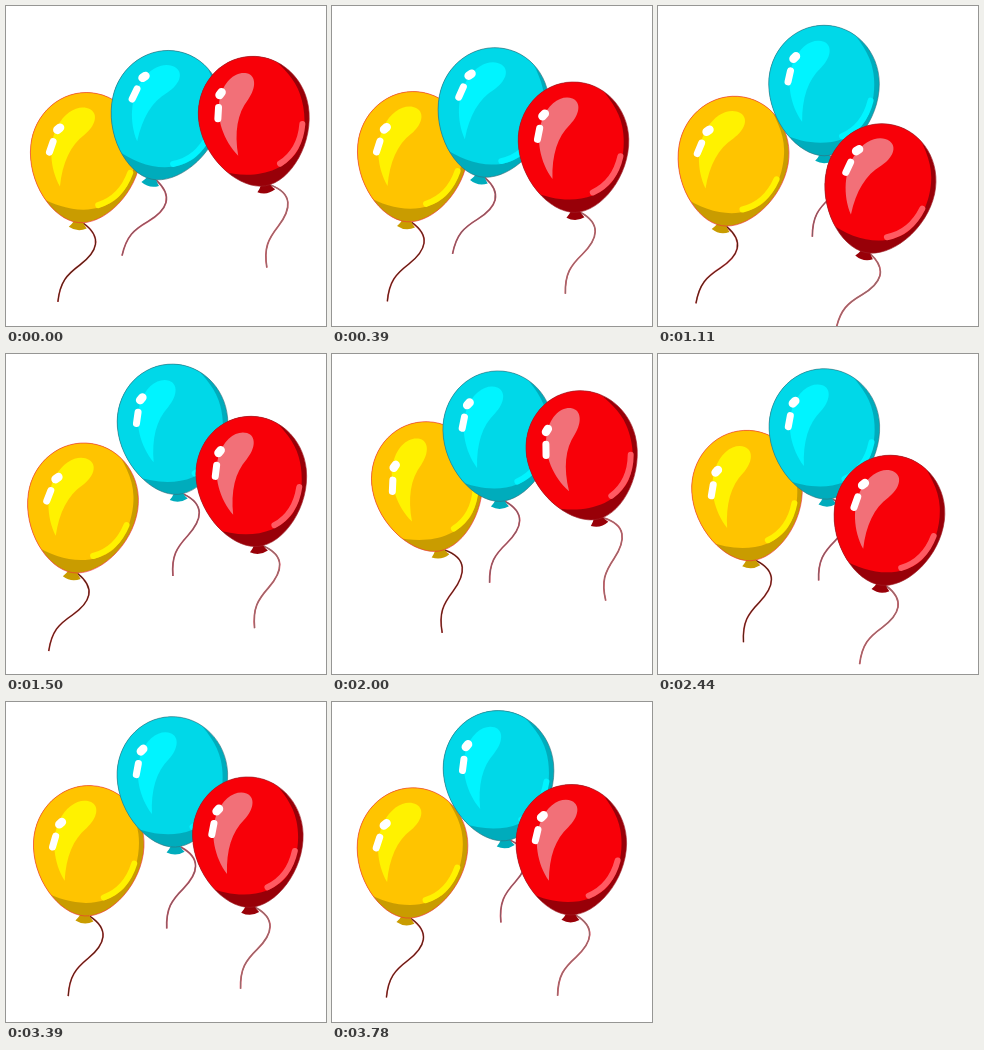
Recreate the animation shown at these times as an HTML page. Size 320x320 px, loop 3840 ms.

```html
<!DOCTYPE html>
<html lang="en">
<head>
<meta charset="utf-8">
<title>Balloons</title>
<style>
  html, body { margin: 0; width: 100%; height: 100%; overflow: hidden; background: #fff; }
  svg { display: block; width: 100%; height: 100%; }
</style>
</head>
<body>
<svg id="stage" viewBox="0 0 320 320">
  <defs>
    <path id="body" d="M0-65.5C31-65.5 55.3-39 55.3-7C55.3 30 26 65 0 65C-26 65-55.3 30-55.3-7C-55.3-39-31-65.5 0-65.5Z"/>
    <clipPath id="inside"><use href="#body"/></clipPath>
    <path id="lit" clip-path="url(#inside)" d="M-42 43C-14 56 18 56 37 36C50 20 52-4 49-20C46-38 34-52 20-70H-70V43Z"/>
    <path id="shine" d="M-22 31C-34 14-38-10-31-28C-24-46-10-53 0-49C9-45 7-33-3-23C-16-11-22 7-22 31Z"/>
    <path id="arc" fill="none" stroke-width="6" stroke-linecap="round" d="M18 45.5Q40 36 46.5 10"/>
    <path id="knot" d="M-4 63H4Q6 67 9 70Q0 75-9 70Q-6 67-4 63Z"/>
    <path id="string" fill="none" d="M5 65C26 77 22 92 6 107C-6 118-12 126-12 146"/>
    <g id="glints" stroke="#fff" stroke-linecap="round">
      <path stroke-width="8.5" d="M-28-34.5L-30.5-32"/>
      <path stroke-width="7" d="M-33.5-20L-36-9"/>
    </g>
  </defs>
</svg>
<script>
const LOOP = 3840, FPS = 18;

// Each balloon swings around a pivot; arm is its centre at 0 degrees.
// turns: the swing's turning points, [time in ms, angle in degrees]
const balloons = [
  {
    base: '#ffc400', shine: '#fff200', dark: '#c99c00', arc: '#fff200', edge: '#f0303c', string: '#4a2410',
    pivot: [21, 82.5], arm: [65, 63], glintDrop: 7,
    turns: [[0, 6], [300, 4.8], [900, 9.8], [1400, 9.6], [2050, -10.5], [2960, 8], [3570, 2], [4000, 9]]
  },
  {
    base: '#00d8e8', shine: '#00f4ff', dark: '#00acbc', arc: '#00f4ff', edge: '#35707c', string: '#7c5f68',
    pivot: [50, 67], arm: [116, 18], glintDrop: 0,
    turns: [[100, 12.5], [1680, -5.2], [1930, -0.3], [2220, -7.4], [2860, 11], [3640, -6.5], [4000, -3]]
  },
  {
    base: '#f80008', shine: '#f27078', dark: '#980008', arc: '#ff5a62', edge: '#a02028', string: '#8c7070',
    pivot: [60, 77], arm: [180, 69], glintDrop: 0,
    turns: [[50, -9.4], [930, 15.2], [1850, -15.4], [2880, 20.3], [3570, -6], [4000, 8]]
  }
];

const use = (id, attributes) => `<use href="#${id}" ${attributes}/>`;

const markup = b =>
  use('string', `stroke="#e04a5a" stroke-width="1.7"`) +
  use('string', `stroke="${b.string}" stroke-width="1"`) +
  use('knot', `fill="${b.dark}"`) +
  use('body', `fill="${b.dark}"`) +
  use('lit', `fill="${b.base}"`) +
  use('body', `fill="none" stroke="${b.edge}" stroke-width=".6"`) +
  use('shine', `fill="${b.shine}"`) +
  use('arc', `stroke="${b.arc}"`) +
  use('glints', `y="${b.glintDrop}"`);

// Sine easing from one turning point to the next.
function angleAt(turns, t) {
  const next = Math.max(1, turns.findIndex(([time]) => time > t));
  const [t0, a0] = turns[next - 1], [t1, a1] = turns[next];
  const u = Math.max(0, (t - t0) / (t1 - t0));
  return a0 + (a1 - a0) * (1 - Math.cos(Math.PI * u)) / 2;
}

const stage = document.getElementById('stage');
for (const b of balloons) {
  b.node = document.createElementNS(stage.namespaceURI, 'g');
  b.node.innerHTML = markup(b);
  stage.append(b.node);
}

const start = performance.now();
function draw() {
  const elapsed = (performance.now() - start) % LOOP;
  const step = Math.min(Math.floor((elapsed + 5) * FPS / 1000), 68);
  const t = step * 1000 / FPS;
  for (const { node, pivot, arm, turns } of balloons)
    node.setAttribute('transform', `translate(${pivot}) rotate(${angleAt(turns, t)}) translate(${arm})`);
  requestAnimationFrame(draw);
}
draw();
</script>
</body>
</html>
```
